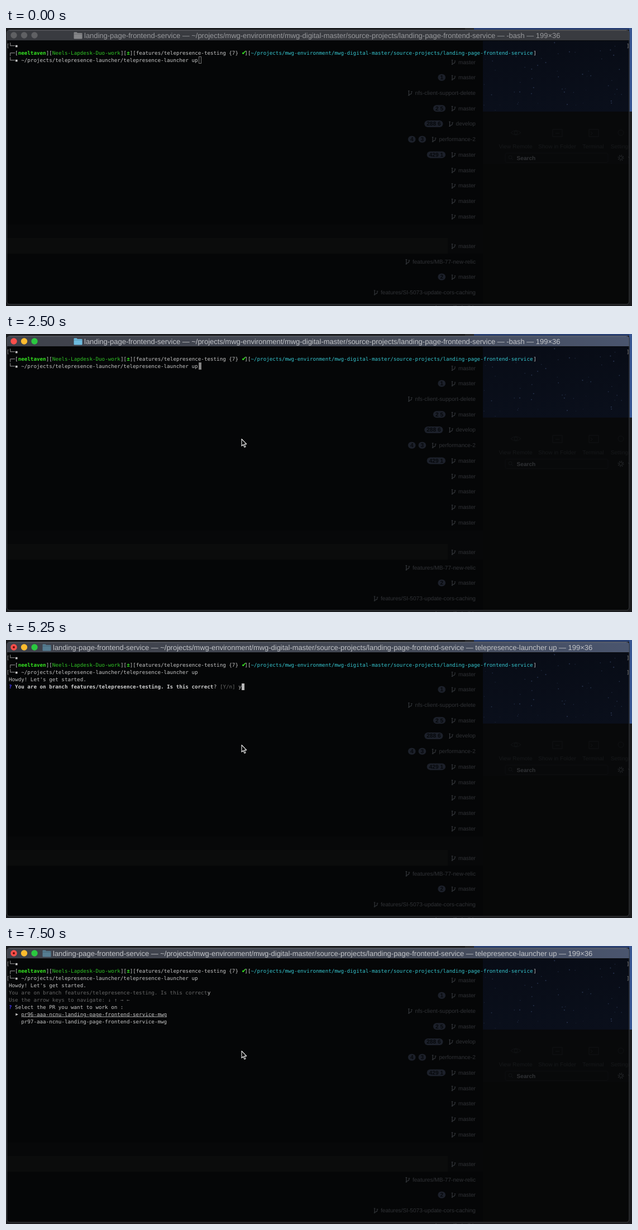
These frames come from a looping animation (1121x499 px, 8000 ms). An HTML page:

```html
<!DOCTYPE html>
<html lang="en">
<head>
<meta charset="utf-8">
<title>Terminal session</title>
<style>
  html, body { margin: 0; width: 100%; height: 100%; overflow: hidden; background: #1b1c1f; }
  svg { display: block; width: 1121px; height: 499px; }
  text { white-space: pre; text-rendering: geometricPrecision; font: 10.15px "Liberation Sans", Arial, sans-serif; }
  .title { font-size: 12.96px; }
  .bold { font-weight: bold; }
  #terminal text { font: 9.23px "DejaVu Sans Mono", monospace; fill: #c4c4c4; }
  #terminal .strong { font-weight: bold; fill: #d0d0d0; }
  #terminal .user { font-weight: bold; fill: #35e321; }
  #terminal .check { font: bold 11px "DejaVu Sans", sans-serif; fill: #35e321; }
  #terminal .arrow { font-size: 12px; }
  #terminal .host { fill: #31c426; }
  #terminal .path { fill: #35c3cc; }
  #terminal .ask { font-weight: bold; fill: #463aff; }
  #terminal .dim { fill: #666; }
  #terminal .mark { fill: #8c8c8c; }
  #terminal .picked { text-decoration: underline; }
</style>
</head>
<body>
<svg id="stage" viewBox="0 0 1121 499">
  <defs>
    <linearGradient id="sky" x2="0" y2="1">
      <stop stop-color="#080c16"/><stop offset="1" stop-color="#0a0f1b"/>
    </linearGradient>
    <linearGradient id="bar">
      <stop stop-color="#3f424b"/><stop offset=".6" stop-color="#434854"/><stop offset="1" stop-color="#4a556e"/>
    </linearGradient>
    <clipPath id="frame"><rect x="1" y="3" width="1115.5" height="493.5" rx="5"/></clipPath>
  </defs>
  <g id="desktop">
    <rect x="822" width="16" height="3" fill="#2a2c30"/>
    <rect x="838" width="283" height="3" fill="#2a4072"/>
    <rect x="1116" width="5" height="150" fill="#375692"/>
    <text x="768" y="505.5" fill="#a5a7aa">feature/fix-build</text>
  </g>
  <g clip-path="url(#frame)">
    <rect width="1121" height="499" fill="#050607"/>
    <rect x="2" y="353" width="852" height="24" fill="#070809"/>
    <rect x="2" y="377" width="852" height="28" fill="#0b0c0c"/>
    <rect x="791" y="377" width="63" height="28" fill="#070809"/>
    <rect x="854" y="22" width="263" height="128" fill="url(#sky)"/>
    <rect x="854" y="150" width="263" height="94" fill="#08090a"/>
    <rect x="854" y="244" width="263" height="255" fill="#070808"/>
    <g id="stars" fill="#26324c"></g>
    <g fill="none" stroke="#101214">
      <path d="M904 188q9-8 18 0q-9 8-18 0M979 182h17v13h-17zm5 7h7M1044 182h17v13h-17zm3 4 3 3-3 3"/>
      <circle cx="913" cy="188" r="3"/><circle cx="1101" cy="188" r="5"/>
      <rect x="894" y="224.5" width="184" height="17" rx="3" stroke="#0d0e10"/>
      <circle cx="903" cy="232" r="3"/><path d="m905 234 3 3"/>
      <g stroke="#222427"><circle cx="1101" cy="233" r="2.8"/>
        <circle cx="1101" cy="233" r="4.6" stroke-width="1.8" stroke-dasharray="1.6 2.01"/>
        <path d="m1114 231 2.5 2.5 2.5-2.5"/></g>
    </g>
    <g id="labels" fill="#17191b" text-anchor="middle">
      <text x="912.5" y="215.5">View Remote</text><text x="987" y="215.5">Show in Folder</text>
      <text x="1051.5" y="215.5">Terminal</text><text x="1101" y="215.5">Settings</text>
    </g>
    <text class="bold" x="914.5" y="237" fill="#303235">Search</text>
    <g id="branches"></g>
  </g>
  <g id="chrome"></g>
  <g id="terminal"></g>
  <rect x="1.5" y="3.5" width="1114.5" height="492.5" rx="5" fill="none" stroke="#45474b"/>
  <g id="pointers"></g>
</svg>
<script>
const LOOP = 8000;
const FOCUS = 1250, FILL = 1500, ENTER = 2750, HELLO = 3000, ASK = 3500, REPLY = 5250, CHOOSE = 5500;
const timed = [];
const layer = id => document.getElementById(id);

function add(parent, tag, attrs, from = 0, to = LOOP) {
  const node = document.createElementNS("http://www.w3.org/2000/svg", tag);
  const { content, ...rest } = attrs;
  for (const key in rest) node.setAttribute(key, rest[key]);
  if (content !== undefined) node.textContent = content;
  parent.append(node);
  if (from > 0 || to < LOOP) timed.push({ node, from, to });
  return node;
}

// Dim repository list showing through the window
function branch(y, name, ...badges) {
  const list = layer("branches");
  const label = add(list, "text", { x: 841, y: y + 3.5, "text-anchor": "end", fill: "#303236", content: name });
  const left = 841 - label.getComputedTextLength();
  add(list, "path", {
    transform: `translate(${left - 13} ${y - 5})`, fill: "none", stroke: "#33363a", "stroke-width": 1.2,
    d: "M2 1v9M2 8q5 0 5-4M.7 1.5h2.6M.7 9.5h2.6M5.7 3h2.6"
  });
  let right = left - 23;
  for (const badge of badges.reverse()) {
    const text = add(list, "text", { class: "bold", y: y + 3.5, "text-anchor": "middle", fill: "#06080b", content: badge });
    const width = text.getComputedTextLength() + 8;
    const pill = add(list, "rect", { x: right - width, y: y - 6, width, height: 12, rx: 6, fill: "#1c202a" });
    text.setAttribute("x", right - width / 2);
    list.insertBefore(pill, text);
    right -= width + 5;
  }
}
const row = i => 61 + 27.73 * i;
[["master"], ["master", "1"], ["nfs-client-support-delete"], ["master", "2 5"], ["develop", "288 6"],
 ["performance-2", "4", "3"], ["master", "429 1"], ["master"], ["master"], ["master"], ["master"]]
  .forEach(([name, ...badges], i) => branch(row(i), name, ...badges));
[["master"], ["features/MB-77-new-relic"], ["master", "2"], ["features/SI-5073-update-cors-caching"]]
  .forEach(([name, ...badges], i) => branch(row(i) + 330.3, name, ...badges));

let seed = 7;
const random = () => (seed = seed * 16807 % 2147483647) / 2147483647;
for (let i = 0; i < 55; i++)
  add(layer("stars"), "circle", { cx: 856 + random() * 258, cy: 26 + random() * 122, r: 0.4 + random() * 0.7 });

// Title bar
const service = "landing-page-frontend-service";
const folder = "~/projects/mwg-environment/mwg-digital-master/source-projects/" + service;
function titleBar(from, to, { x, job, fill, ink, icon, lights, edited }) {
  const bar = add(layer("chrome"), "g", {}, from, to);
  add(bar, "path", { d: "M1.5 22V8q0-4.5 5-4.5H1111q5 0 5 4.5V22z", fill });
  add(bar, "path", { d: "M6 4.5H1111", stroke: "#fff", "stroke-opacity": 0.13 });
  add(bar, "path", { d: "M2 22.5H1116", stroke: "#0b0c0e" });
  lights.forEach((color, i) => add(bar, "circle", { cx: 14 + 18.5 * i, cy: 13, r: 5.7, fill: color }));
  if (edited) add(bar, "circle", { cx: 14, cy: 13, r: 2, fill: "#6b0d0b" });
  add(bar, "path", { transform: `translate(${x - 18.5} 7.5)`, d: "M0 1q0-1 1-1h4l1.5 1.5H14q1 0 1 1V11q0 1-1 1H1q-1 0-1-1z", fill: icon });
  add(bar, "path", { transform: `translate(${x - 18.5} 7.5)`, d: "M0 3.5h15", stroke: "#000", "stroke-opacity": 0.2 });
  add(bar, "text", { class: "title", x, y: 18, fill: ink, content: `${service} — ${folder} — ${job} — 199×36` });
}
const lit = ["#fb4f4b", "#fdbb2f", "#2bc840"];
titleBar(0, FOCUS, { x: 140, job: "-bash", fill: "#393b40", ink: "#98999c", icon: "#858689", lights: Array(3).fill("#5f6063") });
titleBar(FOCUS, ENTER, { x: 140, job: "-bash", fill: "url(#bar)", ink: "#c2c4c8", icon: "#6dbbdf", lights: lit });
titleBar(ENTER, LOOP, { x: 84, job: "telepresence-launcher up", fill: "url(#bar)", ink: "#c2c4c8", icon: "#557d92", lights: lit, edited: true });

// Terminal grid
const term = layer("terminal");
const colX = col => 5 + col * 5.557;
const baseline = line => 34.5 + 13 * line;
const put = (line, col, content, style = "", from, to) =>
  add(term, "text", { x: colX(col), y: baseline(line), class: style, content }, from, to);
const brackets = (line, from) => {
  add(term, "text", { x: 0.8, y: baseline(line), class: "mark", content: "[" }, from);
  add(term, "text", { x: 1111, y: baseline(line), class: "mark", content: "]" }, from);
};
const block = (line, col, fill, from, to) =>
  add(term, "rect", { x: Math.ceil(colX(col)), y: 26 + 13 * line, width: 5, height: 12, fill }, from, to);

brackets(0);
put(0, 0, "└─▪");
put(1, 0, "┌─[");
put(1, 3, "neeltaven", "user");
put(1, 12, "][");
put(1, 14, "Neels-Lapdesk-Duo-work", "host");
put(1, 36, "][");
put(1, 38, "±", "user");
put(1, 39, "][features/telepresence-testing {7}");
put(1, 75, "✔", "check");
put(1, 76, "][");
put(1, 78, folder, "path");
put(1, 169, "]");
put(2, 0, "└─▪ ~/projects/telepresence-launcher/telepresence-launcher up");
add(term, "rect", { x: 345.5, y: 51.5, width: 4, height: 12, fill: "none", stroke: "#777" }, 0, ENTER);
add(term, "rect", { x: 346, y: 52, width: 3, height: 11, fill: "#888" }, FILL, ENTER);

brackets(2, ENTER);
block(3, 0, "#b2b2b2", ENTER, HELLO);
put(3, 0, "Howdy! Let's get started.", "", HELLO);
block(4, 0, "#b2b2b2", HELLO, ASK);

const question = "You are on branch features/telepresence-testing. Is this correct";
put(4, 0, "?", "ask", ASK, CHOOSE);
put(4, 2, question, "strong", ASK, CHOOSE);
put(4, 66, "?", "", ASK, CHOOSE);
put(4, 68, "[Y/n]", "dim", ASK, CHOOSE);
block(4, 74, "#b8b8b8", ASK, REPLY);
put(4, 74, "y", "", REPLY, CHOOSE);
block(4, 75, "#b8b8b8", REPLY, CHOOSE);

put(4, 0, question, "dim", CHOOSE);
put(4, 64, "y", "", CHOOSE);
put(5, 0, "Use the arrow keys to navigate: ↓ ↑ → ←", "dim", CHOOSE);
put(6, 0, "?", "ask", CHOOSE);
put(6, 2, "Select the PR you want to work on :", "", CHOOSE);
put(7, 2, "▸", "arrow", CHOOSE);
put(7, 4, `pr96-aaa-ncnu-${service}-mwg`, "picked", CHOOSE);
put(8, 4, `pr97-aaa-ncnu-${service}-mwg`, "", CHOOSE);

// Mouse pointer
const pointer = (x, y, from, to) => add(layer("pointers"), "path", {
  transform: `translate(${x} ${y})`, d: "M.5.5V13l2.9-2.7 2.1 5 2-.9-2.1-4.8h3.9z",
  fill: "#050505", stroke: "#eee", "stroke-width": 1.1, "stroke-linejoin": "round"
}, from, to);
pointer(556.5, 68, 500, 750);
pointer(421.5, 188, 750, LOOP);

function draw() {
  const time = performance.now() % LOOP;
  for (const { node, from, to } of timed)
    node.style.display = time >= from && time < to ? "" : "none";
  requestAnimationFrame(draw);
}
draw();
</script>
</body>
</html>
```
